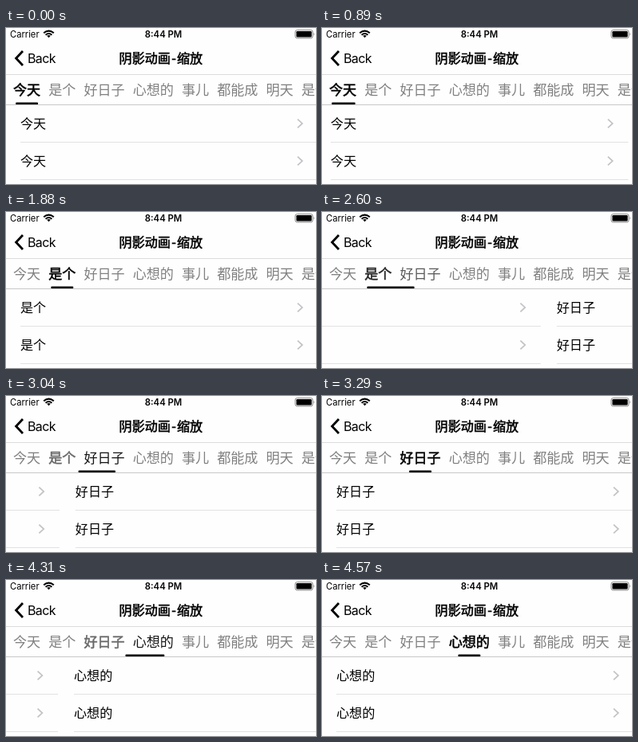
An HTML page for the animation above (5.41 s loop, 388 by 196 pixels).

```html
<!DOCTYPE html>
<html lang="zh-CN">
<head>
<meta charset="utf-8">
<style>
html, body { margin: 0; width: 100%; height: 100%; overflow: hidden; background: #fefefe; }
svg { display: block; width: 100%; height: 100%; }
text { font-family: "Noto Sans CJK SC", "Noto Sans CJK", sans-serif; }
.latin { font-family: Inter, sans-serif; }
.row { font-size: 16.1px; }
.tab { font-size: 17.1px; }
.line { fill: none; stroke: #000; }
.semi { stroke-width: .55; }
</style>
</head>
<body>
<svg viewBox="0 0 388 196">
  <defs><clipPath id="list"><rect y="97" width="388" height="99"/></clipPath></defs>
  <rect width="388" height="196" fill="#fefefe"/>

  <text class="latin" x="5" y="12" font-size="11.2">Carrier</text>
  <g class="line" stroke-width="2">
    <path d="M47.2 6.3Q53.5 0.9 59.8 6.3"/>
    <path d="M49.6 8.7Q53.5 5.4 57.4 8.7"/>
  </g>
  <path d="M51.2 9.8Q53.5 8.2 55.8 9.8L53.5 12.3Z"/>
  <text class="latin" x="197" y="12" font-size="11.3" font-weight="600" text-anchor="middle">8:44 PM</text>
  <rect x="362" y="2.6" width="22" height="10.2" rx="2.4" fill="none" stroke="#858585"/>
  <rect x="363.4" y="4" width="19.2" height="7.4" rx="1.2"/>
  <path d="M385.2 6Q387 7.7 385.2 9.4Z" fill="#858585"/>

  <path class="line" d="M21 29L12.6 38L21 47" stroke-width="2.8"/>
  <text class="latin" x="27" y="43.6" font-size="16" letter-spacing="-.6">Back</text>
  <text class="semi" x="141.6" y="43.9" font-size="16.1" stroke="#000">阴影动画<tspan dx="1.2">-</tspan><tspan dx="1.2">缩放</tspan></text>
  <rect y="58" width="388" height="1" fill="#dcdcdc"/>

  <g clip-path="url(#list)"><g id="strip"></g></g>
  <rect y="96" width="388" height="1" fill="#c8c8c8"/>
  <g id="tabs"></g>
  <rect id="bar" y="93.4" height="2.7" rx="1.2"/>
</svg>
<script>
const LOOP = 5410, PAGE = 392.4, ROW = 47.1, TOP = 96.4;
const SIZE = 17.1, GAP = 10, BAR = 28;
const names = ['今天', '是个', '好日子', '心想的', '事儿', '都能成', '明天', '是个'];
const $ = id => document.getElementById(id);

function add(parent, tag, attrs, text) {
  const el = document.createElementNS('http://www.w3.org/2000/svg', tag);
  for (const key in attrs) el.setAttribute(key, attrs[key]);
  if (text) el.textContent = text;
  parent.appendChild(el);
  return el;
}

let left = 9;
const tabs = names.map(name => {
  const width = name.length * SIZE;
  const el = add($('tabs'), 'text', { class: 'tab semi', x: left, y: 83.7 }, name);
  const tab = { el, start: left + width / 2 - BAR / 2 };
  left += width + GAP;
  return tab;
});

names.slice(0, 4).forEach((name, i) => {
  const page = add($('strip'), 'g', { transform: `translate(${i * PAGE} 0)` });
  for (let r = 0; r < 2; r++) {
    const mid = TOP + ROW * (r + .5);
    add(page, 'text', { class: 'row', x: 18, y: mid + 6 }, name);
    add(page, 'path', { d: `M365 ${mid - 5.4}l5.8 5.4l-5.8 5.4`, fill: 'none', stroke: '#c4c4c7', 'stroke-width': 1.8 });
    add(page, 'rect', { x: 18, y: Math.floor(TOP + ROW * (r + 1)), width: 372.5, height: 1, fill: '#e2e2e4' });
  }
});

const even = (a, b, n) => Array.from({ length: n }, (_, i) => a + (b - a) * i / (n - 1));
const smooth = u => u * u * (3 - 2 * u);
const easeOut = u => 1 - (1 - u) ** 3;

// Each swipe is a drag part way, a pause, then a settle onto the next page.
const swipes = [
  { drag: [890, 950, 990, 1030, 1070, 1120, 1160, 1200, 1250], settle: even(1520, 1880, 11), held: 187 },
  { drag: even(2480, 2720, 5), settle: [2960, 3000, 3040, 3090, 3140, 3190, 3240, 3290], held: 187 },
  { drag: even(3790, 3930, 4), settle: even(4190, 4570, 9), held: 193 }
];

// Progress of a stepped move; it is already under way at its first step.
function progress(t, steps, lead, ease) {
  const now = steps.filter(s => s <= t + .01).pop();
  if (now === undefined) return 0;
  const a = steps[0] - lead;
  return ease((now - a) / (steps[steps.length - 1] - a));
}

function scrollAt(t) {
  return swipes.reduce((sum, s) => sum
    + s.held * progress(t, s.drag, 48, smooth)
    + (PAGE - s.held) * progress(t, s.settle, 30, easeOut), 0);
}

function draw(t) {
  const x = scrollAt(t), pos = x / PAGE;
  const index = Math.floor(pos + 1e-6), p = Math.max(0, pos - index);
  $('strip').setAttribute('transform', `translate(${-x} 0)`);

  tabs.forEach(({ el }, i) => {
    const near = Math.max(0, 1 - Math.abs(i - pos));
    const grey = Math.round(128 * (1 - near));
    const color = `rgb(${grey},${grey},${grey})`;
    el.setAttribute('fill', color);
    el.setAttribute('stroke', i === index ? color : 'none');
  });

  // The leading edge stretches first, then the trailing edge catches up.
  const from = tabs[index].start, gap = tabs[index + 1].start - from;
  const tail = from + gap * Math.max(0, 2 * p - 1);
  const head = from + gap * Math.min(1, 2 * p) + BAR;
  $('bar').setAttribute('x', tail);
  $('bar').setAttribute('width', head - tail);
}

const began = performance.now();
function tick() {
  draw((performance.now() - began) % LOOP);
  requestAnimationFrame(tick);
}
tick();
</script>
</body>
</html>
```
